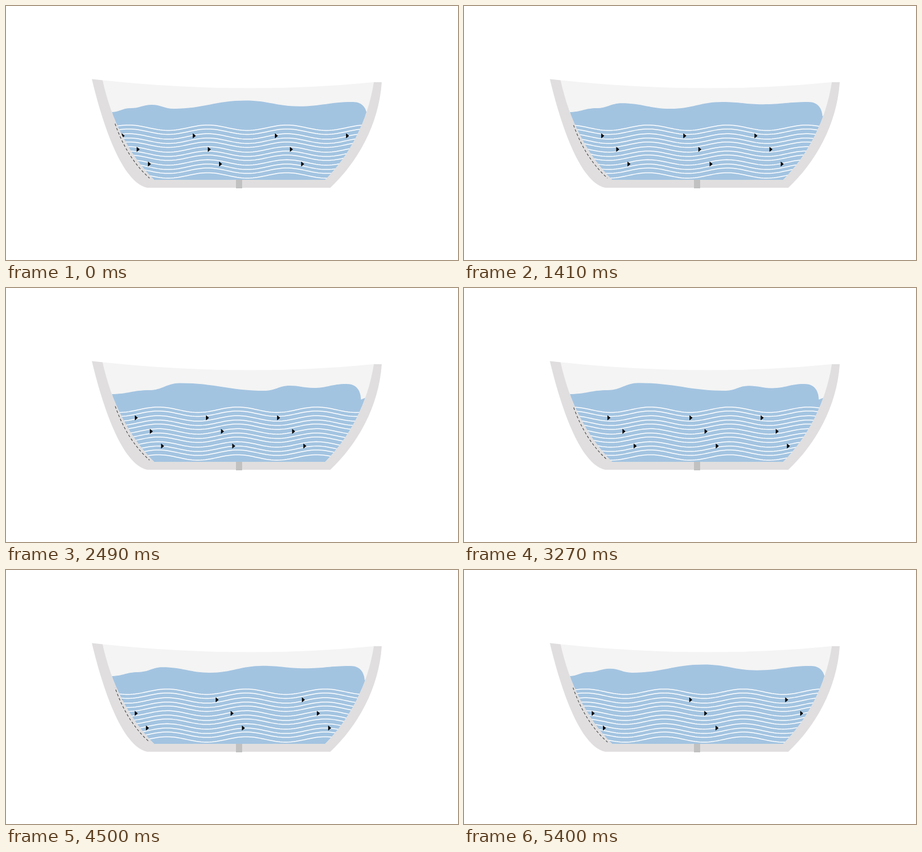
An HTML page with a canvas for the animation above (5.43 s loop, 800 by 450 pixels).

```html
<!DOCTYPE html>
<html lang="en">
<head>
<meta charset="utf-8">
<title>Bathtub flow</title>
<style>
html, body { margin: 0; width: 100%; height: 100%; overflow: hidden; background: #fff; }
canvas { display: block; }
</style>
</head>
<body>
<canvas id="stage" width="800" height="450"></canvas>
<script>
const ctx = document.getElementById('stage').getContext('2d');
const LOOP = 5430;
const WATER = '#a3c4e1';

const inside = new Path2D('M171 131.5C186 200 216 262 262 308H565C608 265 640 205 651 135Q420 157.7 171 131.5Z');
const shell = new Path2D('M152 129.5C170 205 204 312 250 322H574C622 277 660 210 665 135H651' +
  'C640 205 608 265 565 308H262C216 262 186 200 171 131.5Z');
const basin = new Path2D('M186 190.5L200 196L625 199L642 192V308H186Z');
const inlet = new Path2D('M193 208.5C206 246 225 279 254 305');
const arrow = new Path2D('M-2.5 -4.5L2.8 0L-2.5 4.5Z');

// Crests and troughs of the surface swing sideways together, each by its own reach.
function surface(t) {
  const swing = Math.cos(2 * Math.PI * (t / LOOP - .54));
  const end = 633.5 - 6 * swing;
  const points = [
    [238 + 18 * swing, 181],
    [284 + 27 * swing, 171.5 - 3.5 * swing],
    [382 + 88 * swing, 182],
    [465 + 42 * swing, 170.5 + 3 * swing],
    [532 + 14 * swing, 174 + 4 * swing ** 2],
    [end - 27, 170]
  ];

  const path = new Path2D('M186 210V188');
  let [px, py] = [186, 188];
  for (const [x, y] of points) {
    const reach = (x - px) * .42;
    path.bezierCurveTo(px + reach, py, x - reach, y, x, y);
    [px, py] = [x, y];
  }
  path.bezierCurveTo(end - 10, 169, end, 180, end, 198);
  path.lineTo(end, 210);
  return path;
}

function drawWaves(t) {
  const crest = 77 + t * 420 / LOOP;
  ctx.strokeStyle = '#fff';
  ctx.lineWidth = 1.5;
  for (let n = 0; n < 12; n++) {
    // lines come in threes, the middle one slightly raised
    const mid = 215.7 + n * 7.68 - (n % 3 === 1 ? .7 : 0);
    ctx.beginPath();
    for (let x = 185; x <= 645; x += 4) {
      ctx.lineTo(x, mid - 4.8 * Math.cos((x - crest) * Math.PI / 70));
    }
    ctx.stroke();
  }
}

// Arrows leave the wall in uneven threes; the last few come ever later.
const birth = n => n * LOOP / 9 - 32 - 34 * Math.sin(n * 2 * Math.PI / 3) + 122 * Math.max(0, n - 5) ** 1.4;

function drawArrows(t) {
  ctx.fillStyle = '#000';
  for (let n = -3; n <= 8; n++) {
    const x = 200 + (t - birth(n)) * .2194;
    if (x < 190) continue;
    for (const [dx, y] of [[0, 230], [26.6, 254], [46.5, 280]]) {
      ctx.save();
      ctx.translate(x + dx, y);
      ctx.fill(arrow);
      ctx.restore();
    }
  }
}

function fill(path, color) {
  ctx.fillStyle = color;
  ctx.fill(path);
}

function draw() {
  const t = performance.now() % LOOP;
  ctx.fillStyle = '#fff';
  ctx.fillRect(0, 0, 800, 450);
  fill(inside, '#f4f4f4');

  ctx.save();
  ctx.clip(inside);
  fill(basin, WATER);
  fill(surface(t), WATER);
  drawWaves(t);
  drawArrows(t);
  ctx.restore();

  fill(shell, '#e0dedf');
  ctx.fillStyle = '#c1c1c1';
  ctx.fillRect(407, 308, 11, 15);

  ctx.save();
  ctx.strokeStyle = '#444';
  ctx.lineWidth = 1.1;
  ctx.setLineDash([4.5, 3.5]);
  ctx.lineDashOffset = -t * 72 / LOOP;
  ctx.stroke(inlet);
  ctx.restore();

  requestAnimationFrame(draw);
}
draw();
</script>
</body>
</html>
```
